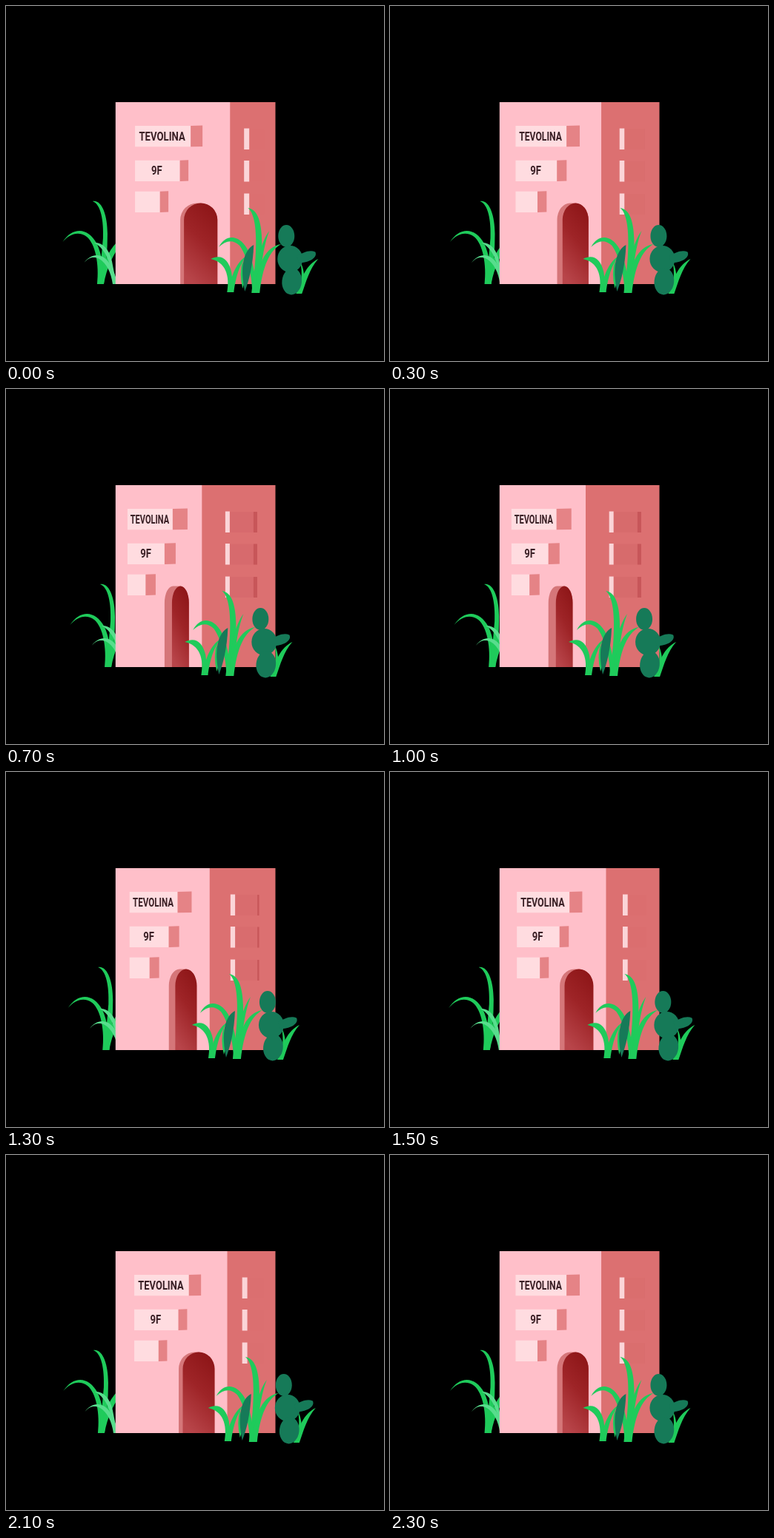
Recreate the animation shown at these times as an HTML page. Size 510x480 px, loop 2.4 s.

```html
<!DOCTYPE html>
<html lang="en">
<head>
<meta charset="utf-8">
<title>Pink building</title>
<style>
  html, body { margin: 0; width: 100%; height: 100%; overflow: hidden; background: #000; }
  svg { display: block; width: 510px; height: 480px; }
  text { font: 600 16px Roboto, "Open Sans", sans-serif; fill: #3a2026; text-anchor: middle; }
  .leaf { fill: #1fcb5b; }
  .pale { fill: #58dd8d; }
  .cactus { fill: #167a58; }
</style>
</head>
<body>
<svg viewBox="0 0 510 480">
  <defs>
    <linearGradient id="doorway" x1=".7" y1="0" x2=".3" y2="1">
      <stop offset="0" stop-color="#8e1618"/>
      <stop offset=".45" stop-color="#9e2427"/>
      <stop offset="1" stop-color="#b8454a"/>
    </linearGradient>
  </defs>

  <g id="leftGrass">
    <g class="leaf">
      <path d="M124 376Q129 345 131 314C132 290 128 268 117 264C130 262 137 284 137 308Q137 340 132 376Z"/>
      <path d="M76.5 319C90 298 111 299 123 322Q132 342 132 376L123 376C126 350 121 322 109 312C98 304 86 308 76.5 319Z"/>
      <path d="M127 376Q131 338 150 319L160 316Q138 342 132 376Z"/>
    </g>
    <g class="pale">
      <path d="M105 348C115 333 130 334 139 347Q147 360 151 376L144 376C142 360 135 347 126 342C118 338 111 340 105 348Z"/>
      <path d="M119 320C130 319 139 328 143 345L149 376L145 376C142 350 136 329 119 320Z"/>
    </g>
  </g>

  <path id="side" fill="#dc7071"/>
  <path id="front" fill="#ffbfc9"/>
  <g id="windows"></g>
  <path id="doorFrame" fill="#d57679"/>
  <path id="door" fill="url(#doorway)"/>
  <text id="sign">TEVOLINA</text>
  <text id="floor">9F</text>

  <g id="rightPlants">
    <g class="leaf">
      <path d="M276 342C289 335 300 341 304 360L307 387L298 387C302 365 296 346 276 342Z"/>
      <path d="M300 387C303 365 311 346 324 338C315 350 310 365 307 387Z"/>
      <path d="M287 326C296 308 314 309 325 328Q336 350 338 388L332 388C332 360 323 335 315 324C306 315 296 317 287 326Z"/>
      <path d="M331 388C338 345 342 285 326 273C350 276 347 330 341 388Z"/>
      <path d="M337 388C337 350 342 322 355 304C347 325 344 350 341 388Z"/>
      <path d="M336 388C338 350 350 325 371 322C355 331 346 352 342 388Z"/>
      <path d="M319 382Q314 362 319 344L322 372Z"/>
      <path d="M393 389C397 368 405 350 421 342C409 356 405 372 399 389Z"/>
      <path d="M391 389C399 375 400 362 397 346C405 362 402 378 397 389Z"/>
    </g>
    <g class="cactus">
      <path d="M334 323C320 330 315 355 322 386C328 370 333 350 334 323Z"/>
      <ellipse cx="378" cy="311" rx="11" ry="15"/>
      <ellipse cx="383" cy="342" rx="17" ry="18"/>
      <ellipse cx="385.5" cy="372.5" rx="13.3" ry="18" transform="rotate(6 386 372)"/>
      <path d="M392 338C400 334 409 329 417 332.500C421 340 408 348 395 347Z"/>
    </g>
  </g>
</svg>
<script>
const LOOP = 2400, STEP = 100, SWING = 2000;
const FAR = 303.8, NEAR = 264;
const $ = id => document.getElementById(id);
const mix = (a, b, k) => a + (b - a) * k;
const clamp = v => Math.min(1, Math.max(0, v));
const ease = v => { const u = clamp(v); return u * u * u * (u * (6 * u - 15) + 10); };

function addPath(fill) {
  const path = document.createElementNS("http://www.w3.org/2000/svg", "path");
  path.setAttribute("fill", fill);
  $("windows").append(path);
  return path;
}
const draw = (path, d) => path.setAttribute("d", d);
const quad = (x1, x2, top, bottom, rise = 0) =>
  `M${x1} ${top}L${x2} ${top - rise}V${bottom - rise}L${x1} ${bottom}Z`;

// Ranges run from the wide view of the front to the narrow one.
const frontWindows = [
  { y: 162, glass: [249, 225], jamb: [265, 245] },
  { y: 208.7, glass: [234.5, 214], jamb: [246, 229] },
  { y: 250.7, glass: [207.6, 188.5], jamb: [219, 202] }
].map(w => ({ ...w, pane: addPath("#ffdce0"), edge: addPath("#e58386") }));

const sideWindows = [165.5, 209, 253.5].map(y => ({
  y, recess: addPath("#d4686a"), shade: addPath("#c75659"), pane: addPath("#fbd5d8")
}));

// Horizontal place of the building's corner.
function corner(t) {
  if (t >= 900 && t < 1840) return mix(NEAR, FAR, ease((t - 980) / 860));
  const since = t < 900 ? t : t - SWING;
  return mix(FAR, NEAR, ease((since + 165) / 960));
}

function arch(left, right, radius) {
  return `M${left} 376V289A${radius} 22.5 0 0 1 ${left + radius} 266.5` +
    `H${right - radius}A${radius} 22.5 0 0 1 ${right} 289V376Z`;
}

function render(t) {
  const x = corner(t);
  const k = (302 - x) / 37.5;
  const at = (a, b) => mix(a, b, k);

  draw($("side"), quad(x - 2, 363.5, 130, 376));
  draw($("front"), quad(147.8, x, 130, 376));

  for (const w of frontWindows) {
    const glass = at(...w.glass);
    draw(w.pane, quad(at(174, 164), glass, w.y, w.y + 28.3));
    draw(w.edge, quad(glass, at(...w.jamb), w.y, w.y + 28.3, .4));
  }

  for (const w of sideWindows) {
    const left = at(321, 296), inner = at(328, 302), right = at(348, 339);
    draw(w.pane, quad(left, inner, w.y, w.y + 28.5));
    draw(w.recess, quad(inner, right, w.y + .5, w.y + 28.5));
    draw(w.shade, quad(right - 5 * clamp(k * 2 - 1), right, w.y + .5, w.y + 28.5));
    w.recess.setAttribute("opacity", clamp(.1 + .5 * k));
  }

  const doorLeft = at(240, 224), doorRight = at(285, 247);
  const radius = (doorRight - doorLeft) / 2;
  draw($("doorFrame"), arch(at(235, 214), doorRight, radius));
  draw($("door"), arch(doorLeft, doorRight, radius));

  $("sign").setAttribute("transform", `translate(${at(210.5, 194)} 182) scale(${at(.82, .69)} 1)`);
  $("floor").setAttribute("transform", `translate(${at(203.2, 188.7)} 228) scale(.82 1)`);
  $("leftGrass").setAttribute("transform", `translate(${10 * k} 0)`);
  $("rightPlants").setAttribute("transform", `translate(${-34.5 * k} 0)`);
}

const start = performance.now();
function tick() {
  const t = (performance.now() - start) % LOOP;
  render(Math.floor(t / STEP) * STEP);
  requestAnimationFrame(tick);
}
tick();
</script>
</body>
</html>
```
